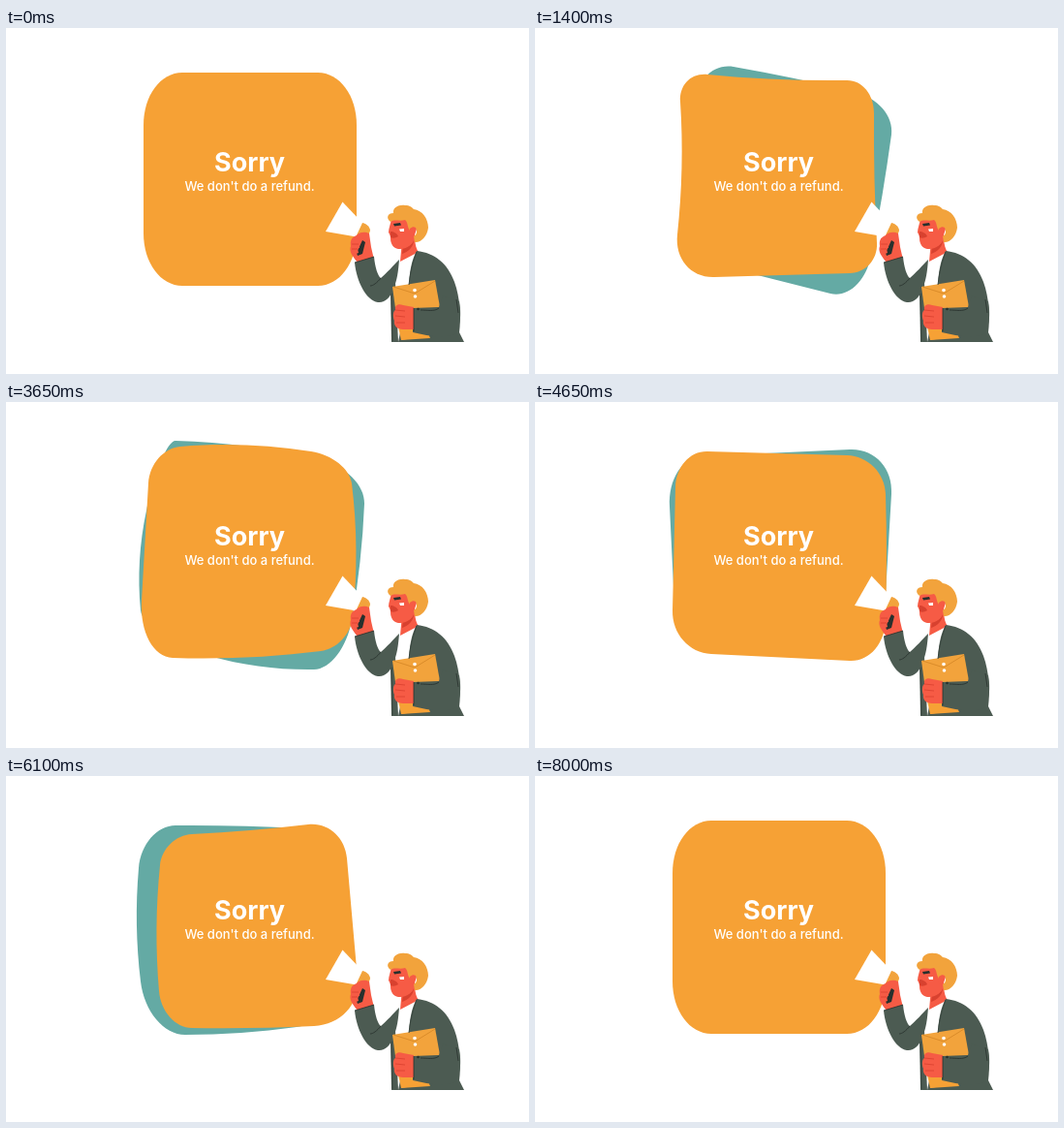
Write an HTML page with a canvas that moves like this. It is 540 by 357 pixels and loops after 8.05 s.

```html
<!DOCTYPE html>
<html lang="en">
<head>
<meta charset="utf-8">
<title>Sorry</title>
<style>
  html, body { margin: 0; width: 100%; height: 100%; overflow: hidden; background: #fff; }
  canvas { display: block; width: 540px; height: 357px; }
</style>
</head>
<body>
<canvas id="stage"></canvas>
<script>
const W = 540, H = 357, LOOP = 8050, CYCLE = 4000, STEP = 50;
const ORANGE = '#f6a135', TEAL = '#64aaa4', GOLD = '#f2a33c', SKIN = '#f65b45',
      SHADE = '#d8412f', JACKET = '#4c5b52', DARK = '#27302d';

const canvas = document.getElementById('stage');
const ctx = canvas.getContext('2d');
const dpr = window.devicePixelRatio || 1;
canvas.width = W * dpr;
canvas.height = H * dpr;
ctx.scale(dpr, dpr);

// A pose: eight x,y anchors clockwise from the top edge, then the
// outward bulge of the top, right, bottom and left edges.
const rest = [182,46, 322,46, 362,100, 362,212, 322,266, 182,266, 142,212, 142,100, 0,0,0,0];

const front = {
  lean:  [178,51, 322,55, 362,95, 362,225, 325,267, 182,260, 142,215, 145,88, 0,1,0,0],
  pinch: [178,48, 322,54, 350,88, 353,222, 325,253, 185,257, 147,213, 150,76, -2,-1,0,-3],
  slide: [192,60, 312,50, 352,85, 363,210, 318,258, 192,260, 158,222, 159,92, -1,0,1,3],
  swell: [190,53, 318,53, 366,108, 366,215, 318,266, 190,261, 144,212, 148,98, 1,0,1,0],
  round: [180,46, 315,51, 357,84, 358,222, 325,257, 172,264, 140,205, 147,84, 4,4,3,0]
};
const back = {
  lean:  [172,56, 325,49, 368,95, 361,215, 320,262, 185,258, 144,210, 139,108, 0,0,0,0],
  pinch: [205,40, 330,66, 368,110, 347,235, 305,274, 190,245, 158,215, 165,80, 1,1,0,0],
  slide: [175,51, 305,54, 345,95, 350,210, 300,259, 185,267, 139,212, 137,95, 1,0,2,3],
  swell: [165,61, 325,45, 366,80, 360,215, 318,258, 185,255, 144,215, 130,98, 1,0,0,0],
  round: [175,40, 325,60, 370,105, 357,225, 318,276, 210,262, 139,215, 145,112, 4,2,4,4]
};

// time, pose name, strength
const keys = [
  [0, null, 0], [350, 'swell', 1.1], [650, 'lean', 1], [1200, 'pinch', 1.2],
  [1400, 'pinch', 1], [2100, 'slide', 1], [2450, 'swell', 1],
  [3480, 'round', 1.25], [3650, 'round', 1]
];

function keyValue(set, key, i) {
  const pose = key[1] ? set[key[1]] : rest;
  return rest[i] + (pose[i] - rest[i]) * key[2];
}

function keyAt(k) {
  const n = keys.length, turn = Math.floor(k / n);
  const key = keys[k - turn * n];
  return { key, time: key[0] + turn * CYCLE };
}

// Cubic Hermite through the keys, wrapping round the cycle.
function poseAt(set, t) {
  let k = keys.length - 1;
  while (keys[k][0] > t) k--;
  const [a, b, c, d] = [-1, 0, 1, 2].map(o => keyAt(k + o));
  const span = c.time - b.time, u = (t - b.time) / span, u2 = u * u, u3 = u2 * u;
  return rest.map((_, i) => {
    const [va, vb, vc, vd] = [a, b, c, d].map(p => keyValue(set, p.key, i));
    const slope = (p, q, r, x, y, z) => {
      const s1 = (y - x) / (q - p), s2 = (z - y) / (r - q);
      return s1 * s2 <= 0 ? 0 : 2 * s1 * s2 / (s1 + s2);
    };
    const m1 = slope(a.time, b.time, c.time, va, vb, vc) * span;
    const m2 = slope(b.time, c.time, d.time, vb, vc, vd) * span;
    return (2 * u3 - 3 * u2 + 1) * vb + (u3 - 2 * u2 + u) * m1 +
           (3 * u2 - 2 * u3) * vc + (u3 - u2) * m2;
  });
}

function meet(p, a, q, b) {
  const det = a[0] * b[1] - a[1] * b[0];
  const s = ((q[0] - p[0]) * b[1] - (q[1] - p[1]) * b[0]) / det;
  return [p[0] + a[0] * s, p[1] + a[1] * s];
}

const mix = (p, q, k) => [p[0] + (q[0] - p[0]) * k, p[1] + (q[1] - p[1]) * k];

function drawBlob(pose, color) {
  const edges = [0, 1, 2, 3].map(e => {
    const p = pose.slice(e * 4, e * 4 + 2), q = pose.slice(e * 4 + 2, e * 4 + 4);
    const dx = q[0] - p[0], dy = q[1] - p[1], len = Math.hypot(dx, dy);
    const bend = pose[16 + e] * 4 / 3, nx = dy / len * bend, ny = -dx / len * bend;
    const h1 = [p[0] + dx / 3 + nx, p[1] + dy / 3 + ny];
    const h2 = [q[0] - dx / 3 + nx, q[1] - dy / 3 + ny];
    return { p, q, h1, h2 };
  });
  ctx.beginPath();
  ctx.moveTo(...edges[0].p);
  edges.forEach((e, i) => {
    const n = edges[(i + 1) % 4];
    const out = [e.q[0] - e.h2[0], e.q[1] - e.h2[1]];
    const into = [n.h1[0] - n.p[0], n.h1[1] - n.p[1]];
    const tip = meet(e.q, out, n.p, into);
    ctx.bezierCurveTo(...e.h1, ...e.h2, ...e.q);
    ctx.bezierCurveTo(...mix(e.q, tip, 0.56), ...mix(n.p, tip, 0.56), ...n.p);
  });
  ctx.fillStyle = color;
  ctx.fill();
}

const fills = [
  // megaphone
  ['#fff', 'M347.5 179.5 L368 201 L362 215.5 L330 210 Z'],
  [GOLD, 'M368 201 C373 202 376 206 376 209 L374 215 L361 216 Z'],
  // raised hand
  [SKIN, 'M362 214 C365 210 371 210 375 212 L377 226 L380 239 L364 243 C357 235 354 230 356 225 C355 219 357 216 362 214 Z'],
  [DARK, 'M368 219 L371 221 L368 233 L363 235 L362 232 Z'],
  [SKIN, 'M357 217 L365 218 L366 221 L358 222 Z M356 223 L364 223 L365 227 L356 228 Z M357 229 L363 228 L364 232 L359 234 Z'],
  // shirt and neck
  ['#fff', 'M406 237 L423 231 L421 268 L399 270 Z'],
  [SKIN, 'M409 219 L422 214 C422 223 424 229 426 231 L407 241 Z'],
  [SHADE, 'M410 226 C415 226 419 224 421 219 C421 225 416 231 409 233 Z'],
  // jacket
  [JACKET, 'M360 242 L380 236 C381 247 384 256 387 258 C393 253 400 245 406 239 C405 251 404 260 400 269 C397 278 391 284 384 283 C372 281 362 262 360 242 Z'],
  [JACKET, 'M424 230 C443 232 456 243 463 262 C469 278 470 300 468 314 L473 324 L405 324 L416 270 C416 252 419 239 424 230 Z'],
  [JACKET, 'M397 270 L402 263 L405 324 L398 324 Z'],
  // envelope
  [GOLD, 'M399 267 L443 260 L448 288 L438 317 L408 322 L404 304 Z'],
  [ORANGE, 'M407 307 L434 311 L438 320 L408 322 Z'],
  // lower arm and hand
  [JACKET, 'M420 289 L447 288 L451 276 L468 282 C471 299 468 314 461 317 C447 320 433 317 420 314 Z'],
  [SKIN, 'M421 288 L421 311 L410 311 C404 311 400 307 401 302 C399 297 400 292 402 291 C401 286 405 284 410 286 Z'],
  // head
  [SKIN, 'M398 197 C397 202 395 207 395 211 C396 213 397 214 397 217 C397 223 400 227 405 228 C414 229 421 223 422 214 L425 199 L413 190 Z'],
  [GOLD, 'M397 200 C392 196 394 191 400 191 C399 185 406 182 412 183 C417 183 419 185 421 187 C430 188 436 197 436 206 C435 215 428 222 422 221 L421 215 C425 213 425 207 421 206 L417 209 C414 205 415 200 412 198 C407 200 401 197 397 200 Z'],
  [SKIN, 'M417 207 C422 203 426 207 422 212 C420 215 417 215 416 213 Z'],
  [SHADE, 'M397 210 C400 210 404 212 405 215 C402 217 399 217 397 216 Z'],
  [DARK, 'M400 202 L407 201 L408 203.5 L401 204.5 Z'],
  ['#fff', 'M406 207.5 L411 207 L411 210 L407 210 Z']
];

const lines = [
  [DARK, 0.8, 'M360 242 L380 236 M387 258 C383 263 379 266 376 266 M421 289 L421 313 M447 289 C442 293 435 291 428 291 M465 280 L467 294'],
  ['#d78a29', 0.9, 'M400 267 L422 274 L443 261'],
  [SHADE, 0.8, 'M402 291 L412 292 M402 297 L412 298 M403 304 L412 304 M357 223 L364 223 M357 228 L363 228'],
  ['#39463f', 1, 'M424 231 C418 248 417 258 416 265 M398 274 L399 323']
];

const fillPaths = fills.map(([c, d]) => [c, new Path2D(d)]);
const linePaths = lines.map(([c, w, d]) => [c, w, new Path2D(d)]);

function dot(x, y, r, color) {
  ctx.beginPath();
  ctx.arc(x, y, r, 0, Math.PI * 2);
  ctx.fillStyle = color;
  ctx.fill();
}

function drawMan() {
  for (const [color, path] of fillPaths) {
    ctx.fillStyle = color;
    ctx.fill(path);
  }
  for (const [color, width, path] of linePaths) {
    ctx.strokeStyle = color;
    ctx.lineWidth = width;
    ctx.stroke(path);
  }
  dot(422, 270.5, 1.8, '#fff');
  dot(422.5, 277, 1.8, '#fff');
  dot(425.5, 290, 1.3, DARK);
}

function drawText(text, y, font) {
  ctx.font = font + ' Inter, "Open Sans", sans-serif';
  ctx.textAlign = 'center';
  ctx.fillStyle = '#fff';
  ctx.fillText(text, 251.5, y);
}

function frame(now) {
  const t = Math.floor((now % LOOP) / STEP) * STEP % CYCLE;
  ctx.fillStyle = '#fff';
  ctx.fillRect(0, 0, W, H);
  if (t > 0) drawBlob(poseAt(back, t), TEAL);
  drawBlob(poseAt(front, t), ORANGE);
  drawText('Sorry', 148, '700 27px');
  drawText("We don't do a refund.", 168, '500 13px');
  drawMan();
}

let start = null;
function tick(now) {
  if (start === null) start = now;
  frame(Math.max(0, now - start));
  requestAnimationFrame(tick);
}
frame(0);
requestAnimationFrame(tick);
</script>
</body>
</html>
```
